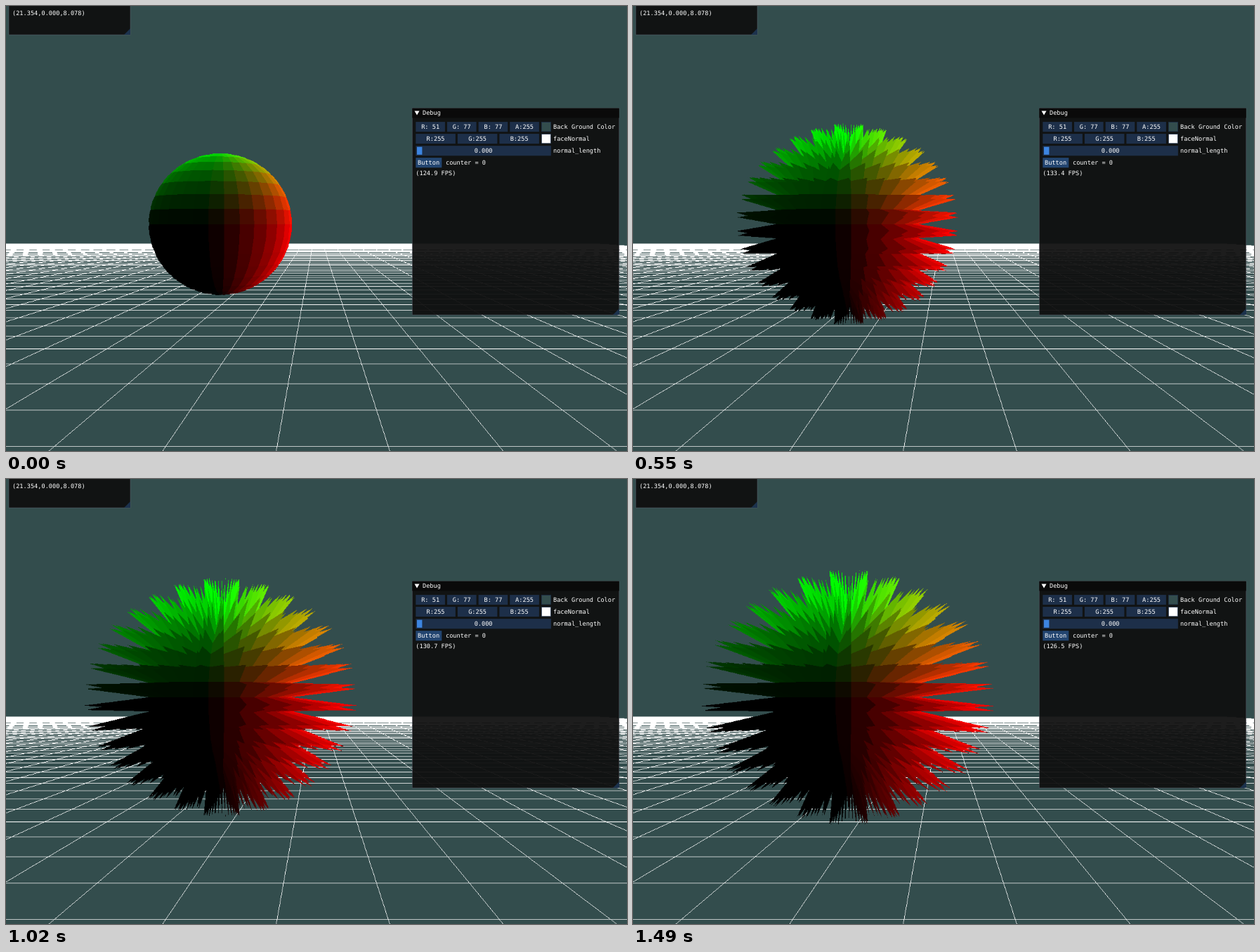
An HTML page with a canvas for the animation above (1570 ms loop, 884 by 634 pixels).

```html
<!DOCTYPE html>
<html lang="en">
<head>
<meta charset="utf-8">
<title>Face normals</title>
<style>
  html, body { margin: 0; width: 884px; height: 634px; overflow: hidden; background: #334d4d; }
  canvas, svg { position: absolute; left: 0; top: 0; width: 884px; height: 634px; display: block; }
  text {
    font: 8.62px "DejaVu Sans Mono", monospace;
    fill: #fff;
    white-space: pre;
    text-rendering: geometricPrecision;
  }
  .mid { text-anchor: middle; }
  .panel { fill: rgba(15, 15, 15, .94); stroke: rgba(110, 110, 128, .5); stroke-width: .74; }
  .field { fill: #1d2f49; }
  .swatch { stroke: #1d2f49; stroke-width: .74; }
  .grip { fill: #1c324d; }
</style>
</head>
<body>
<canvas id="view" width="1193" height="856"></canvas>
<svg viewBox="0 0 884 634">
  <rect class="panel" x="4" y="-20" width="173" height="61"/>
  <path class="grip" d="M177 32v9h-9z"/>
  <text x="9" y="13">(21.354,0.000,8.078)</text>

  <rect class="panel" x="578.3" y="145.6" width="294.5" height="294.5"/>
  <rect x="578.3" y="145.6" width="294.5" height="13.8" fill="#0a0a0a"/>
  <path class="grip" d="M873 431v9h-9z"/>
  <path d="M581.5 149.5h7l-3.5 6z" fill="#fff"/>
  <text x="593" y="155">Debug</text>

  <g id="fields"></g>
  <rect class="swatch" x="762.3" y="165.5" width="13.3" height="13.3" fill="#334d4d"/>
  <rect class="swatch" x="762.3" y="182.5" width="13.3" height="13.3" fill="#fff"/>
  <rect x="585" y="200.7" width="7.4" height="11.1" fill="#3d85e0"/>
  <rect x="583.3" y="216.2" width="37" height="14.1" fill="#234570"/>

  <text x="779" y="175">Back Ground Color</text>
  <text x="779" y="192">faceNormal</text>
  <text x="779" y="209">normal_length</text>
  <text x="586" y="226">Button</text>
  <text x="626" y="226">counter = 0</text>
  <text x="583.3" y="241" id="fps"></text>
</svg>
<script>
// The scene is drawn at its own size; CSS scales the canvas down to the stage.
const W = 1193, H = 856, CX = 596.5, CY = 419.7;
const HALF_W = 600, HALF_H = 450;
const FOCAL = HALF_H / Math.tan(Math.PI / 8);
const EYE_X = 21.354, EYE_Z = 8.078;
const BALL_X = 20, STACKS = 16, SECTORS = 32;
const DEPTH_A = 1.002, DEPTH_B = 0.2002;  // near 0.1, far 100
const LOOP = 1570, LEAD = 12;
const STEPS = [0, 80, 170, 240, 360, 410, 480, 550, 640, 720, 800, 870, 940,
  1020, 1100, 1180, 1260, 1340, 1410, 1490];
const FPS = [[0, 124.9], [170, 125.9], [360, 132.3], [550, 133.4],
  [870, 134.1], [1180, 127], [1490, 126.5]];

const ctx = document.getElementById('view').getContext('2d', { willReadFrequently: true });
const fpsText = document.getElementById('fps');

function buildFields() {
  const left = 583.3, gap = 3;
  const row = (y, total, labels) => {
    const w = (total - gap * (labels.length - 1)) / labels.length;
    return labels.map((s, i) => {
      const x = left + i * (w + gap);
      return `<rect class="field" x="${x}" y="${y}" width="${w}" height="14.1"/>` +
        `<text class="mid" x="${x + w / 2}" y="${y + 9.8}">${s}</text>`;
    }).join('');
  };
  document.getElementById('fields').innerHTML =
    row(165.1, 175.6, ['R: 51', 'G: 77', 'B: 77', 'A:255']) +
    row(182.1, 175.6, ['R:255', 'G:255', 'B:255']) +
    row(199.2, 192.6, ['0.000']);
}

// Floor at y = -2 with unit cells from -50 to 50, drawn without smoothing.
function drawFloor() {
  const drop = 2 * FOCAL, edge = 50 - EYE_X;
  ctx.fillStyle = '#334d4d';
  ctx.fillRect(0, 0, W, H);
  ctx.fillStyle = '#fff';
  for (let k = -50; k <= 3; k++) {
    const d = EYE_Z - k;
    ctx.fillRect(0, Math.floor(CY + drop / d), Math.min(W, Math.round(CX + FOCAL * edge / d)), 1);
  }
  const top = Math.ceil(CY + drop / (EYE_Z + 50));
  for (let k = -50; k <= 50; k++) {
    const at = y => Math.floor(CX + (k - EYE_X) * (y - CY) / 2);
    for (let y = top; y < H; y++) {
      const a = at(y), b = at(y + 1);
      ctx.fillRect(Math.min(a, b), y, Math.max(1, Math.abs(b - a)), 1);
    }
  }
}

const toClip = (x, y, z) => {
  const d = EYE_Z - z;
  return [(x + BALL_X - EYE_X) * FOCAL / HALF_W, y * FOCAL / HALF_H, DEPTH_A * d - DEPTH_B, d];
};
const toScreen = ([x, y, z, w]) => [CX + x / w * HALF_W, CY - y / w * HALF_H, z / w];
const sub = (a, b) => [a[0] - b[0], a[1] - b[1], a[2] - b[2]];
const dot = (a, b) => a[0] * b[0] + a[1] * b[1] + a[2] * b[2];
const cross = (a, b) => [a[1] * b[2] - a[2] * b[1], a[2] * b[0] - a[0] * b[2], a[0] * b[1] - a[1] * b[0]];

// Each face keeps its corners, centroid and normal; the normal is taken in clip space.
function buildFaces() {
  const faces = [], core = toClip(0, 0, 0);
  const vertex = (i, j) => {
    const lat = Math.PI / 2 - i * Math.PI / STACKS, lon = j * 2 * Math.PI / SECTORS;
    return toClip(Math.cos(lat) * Math.cos(lon), Math.sin(lat), Math.cos(lat) * Math.sin(lon));
  };
  const add = (...p) => {
    const mid = p[0].map((_, i) => (p[0][i] + p[1][i] + p[2][i]) / 3);
    let n = cross(sub(p[1], p[0]), sub(p[2], p[0]));
    const len = Math.hypot(...n) * Math.sign(dot(n, sub(mid, core)));
    n = n.map(v => v / len);
    faces.push({ mid, n, corners: p.map(toScreen), color: n.map(v => Math.max(0, v) * 255) });
  };
  for (let i = 0; i < STACKS; i++) {
    for (let j = 0; j < SECTORS; j++) {
      const a = vertex(i, j), b = vertex(i + 1, j), c = vertex(i, j + 1), d = vertex(i + 1, j + 1);
      if (i > 0) add(a, b, c);
      if (i < STACKS - 1) add(c, b, d);
    }
  }
  return faces;
}

function fillTriangle(px, depth, a, b, c, color) {
  const area = (b[0] - a[0]) * (c[1] - a[1]) - (b[1] - a[1]) * (c[0] - a[0]);
  if (Math.abs(area) < 1e-9) return;
  const x0 = Math.max(0, Math.floor(Math.min(a[0], b[0], c[0])));
  const x1 = Math.min(W - 1, Math.ceil(Math.max(a[0], b[0], c[0])));
  const y0 = Math.max(0, Math.floor(Math.min(a[1], b[1], c[1])));
  const y1 = Math.min(H - 1, Math.ceil(Math.max(a[1], b[1], c[1])));
  for (let y = y0; y <= y1; y++) {
    for (let x = x0; x <= x1; x++) {
      const dx = x + 0.5 - a[0], dy = y + 0.5 - a[1];
      const v = (dx * (c[1] - a[1]) - dy * (c[0] - a[0])) / area;
      const w = (dy * (b[0] - a[0]) - dx * (b[1] - a[1])) / area;
      if (v < 0 || w < 0 || v + w > 1) continue;
      const z = a[2] + v * (b[2] - a[2]) + w * (c[2] - a[2]);
      const i = y * W + x;
      if (z > depth[i]) continue;
      depth[i] = z;
      px[i * 4] = color[0];
      px[i * 4 + 1] = color[1];
      px[i * 4 + 2] = 0;
    }
  }
}

buildFields();
drawFloor();
const faces = buildFaces();
const floor = ctx.getImageData(0, 0, W, H);
const floorDepth = new Float32Array(W * H).map((_, i) => floor.data[i * 4] === 255
  ? DEPTH_A - DEPTH_B * (Math.floor(i / W) - CY) / (2 * FOCAL) : 1);

function drawBall(length) {
  const image = new ImageData(new Uint8ClampedArray(floor.data), W, H);
  const depth = floorDepth.slice();
  for (const { mid, n, corners, color } of faces) {
    const tip = toScreen([...n.map((v, i) => mid[i] + v * length), mid[3]]);
    for (let i = 0; i < 3; i++) {
      fillTriangle(image.data, depth, corners[i], corners[(i + 1) % 3], tip, color);
    }
  }
  ctx.putImageData(image, 0, 0);
}

function fpsAt(t) {
  const k = FPS.findLastIndex(f => f[0] <= t);
  const [t0, v0] = FPS[k], [t1, v1] = FPS[k + 1] || [LOOP, v0];
  return v0 + (v1 - v0) * (t - t0) / (t1 - t0);
}

let shown = -1;
function tick() {
  const now = performance.now() % LOOP;
  const t = STEPS.findLast(s => s <= now);
  if (t !== shown) {
    shown = t;
    drawBall(2 * Math.sin((t + LEAD) / 1000));
    fpsText.textContent = `(${fpsAt(t).toFixed(1)} FPS)`;
  }
  requestAnimationFrame(tick);
}
tick();
</script>
</body>
</html>
```
